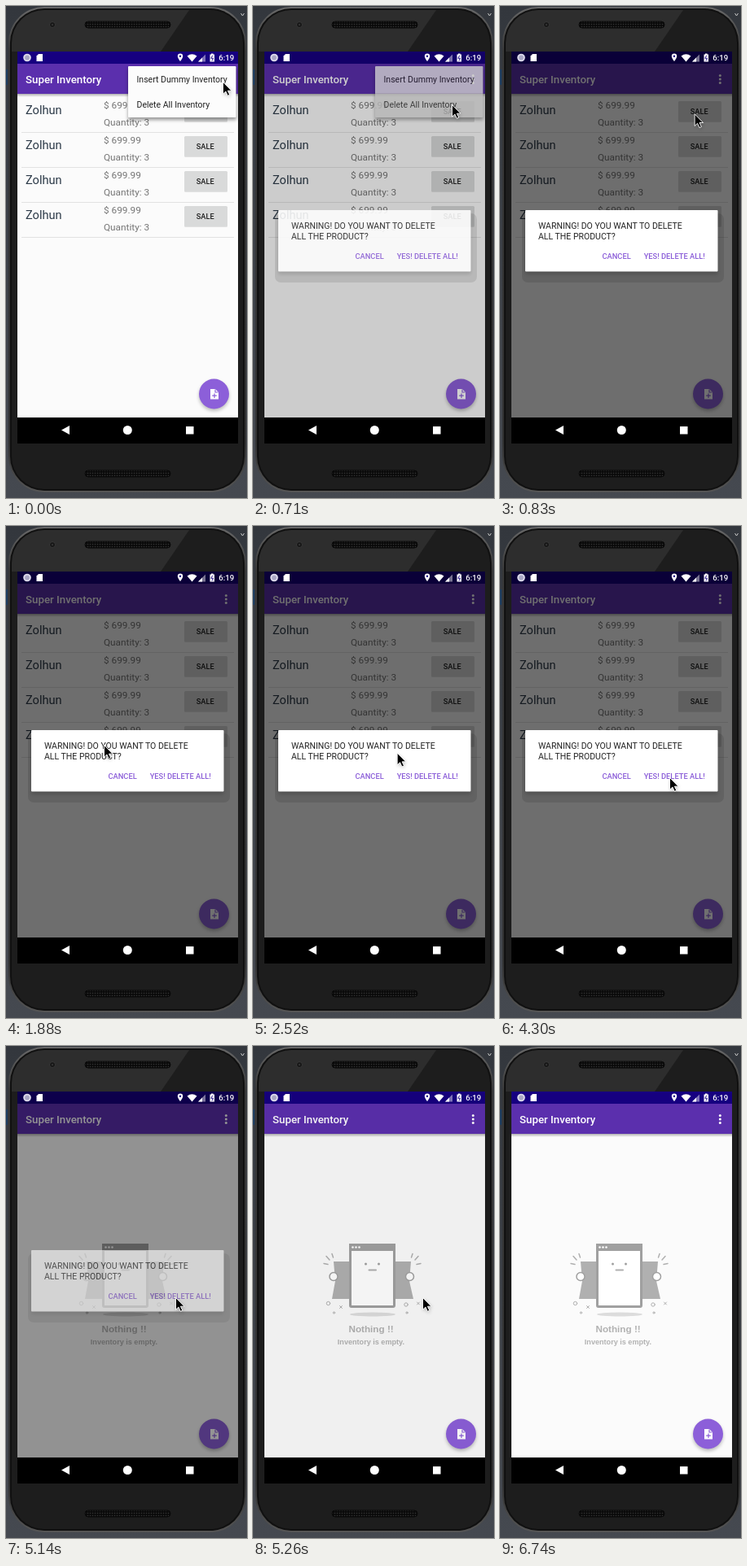
Recreate the animation shown at these times as an HTML page. Size 296x605 px, loop 7.4 s.

```html
<!DOCTYPE html>
<html lang="en">
<head>
<meta charset="utf-8">
<title>Super Inventory</title>
<style>
  html, body { margin: 0; width: 100%; height: 100%; overflow: hidden; background: #3a3e44; }
  svg { display: block; width: 296px; height: 605px; font-family: Roboto, sans-serif; }
  .name { font-size: 14.6px; fill: #2c3a48; }
  .info { font-size: 11.8px; fill: #757575; }
  .sale { font-size: 9.2px; font-weight: 500; fill: #1c1c1c; }
  .title { font-size: 13.3px; font-weight: 500; fill: #fff; }
  .item { font-size: 10.5px; fill: #222; }
  .ask { font-size: 10.5px; fill: #222; }
  .action { font-size: 9.3px; font-weight: 500; fill: #8a5cd8; }
  .note { font-family: "Liberation Sans", Arial, sans-serif; font-weight: bold; fill: #b2b2b2; }
  .line { fill: none; stroke: #b0b0b0; stroke-linecap: round; }
</style>
</head>
<body>
<svg viewBox="0 0 296 605">
  <defs>
    <linearGradient id="back" x2="0" y2="1">
      <stop offset="0" stop-color="#33373d"/><stop offset="1" stop-color="#454950"/>
    </linearGradient>
    <linearGradient id="rim" x2="0" y2="1">
      <stop offset="0" stop-color="#686868"/><stop offset=".09" stop-color="#383838"/>
      <stop offset=".9" stop-color="#303030"/><stop offset="1" stop-color="#555"/>
    </linearGradient>
    <linearGradient id="fall" x2="0" y2="1">
      <stop offset="0" stop-opacity=".3"/><stop offset="1" stop-opacity="0"/>
    </linearGradient>
    <pattern id="mesh" width="3" height="3" patternUnits="userSpaceOnUse">
      <rect width="3" height="3" fill="#0a0a0a"/><circle cx="1.5" cy="1.5" r=".8" fill="#333"/>
    </pattern>
    <filter id="soft" x="-20%" y="-20%" width="140%" height="150%"><feGaussianBlur stdDeviation="2"/></filter>
    <clipPath id="screen"><rect x="14" y="56" width="271" height="450"/></clipPath>
  </defs>

  <!-- phone -->
  <rect width="296" height="605" fill="url(#back)"/>
  <rect y="78" width="2" height="19" fill="#1c3d60"/>
  <path d="M288.500 9L290.500 12 292.500 9" fill="none" stroke="#c8c8c8"/>
  <rect x="3" y="1" width="292" height="597" rx="44" fill="url(#rim)"/>
  <rect x="5" y="3" width="288" height="593" rx="42" fill="#101010"/>
  <rect x="7" y="5" width="284" height="589" rx="40" fill="#1d1d1d"/>
  <path d="M7 56V45A40 40 0 0 1 47 5H225L190 56Z" fill="#fff" opacity=".07"/>
  <circle cx="57" cy="23" r="3.500" fill="#161616" stroke="#383838"/>
  <circle cx="57" cy="23" r="1.200" fill="#333"/>
  <rect x="97" y="19" width="105" height="8" rx="4" fill="url(#mesh)" stroke="#080808"/>
  <rect x="97" y="571" width="105" height="8" rx="4" fill="url(#mesh)" stroke="#080808"/>
  <rect x="14" y="56" width="271" height="482"/>

  <g clip-path="url(#screen)">
    <rect x="14" y="108" width="271" height="398" fill="#fbfbfb"/>
    <g id="list"></g>

    <g id="empty">
      <ellipse cx="147" cy="330" rx="28" ry="2.500" fill="#dcdcdc"/>
      <path d="M99 265H118V311H97L101 289ZM175 265H194L192 289 197 311H175Z" fill="#b0b0b0"/>
      <rect x="119.500" y="244.500" width="54" height="76" rx="1.500" fill="#fff" stroke="#a0a0a0" stroke-width="3"/>
      <path d="M118 243H175V252H118Z" fill="#a0a0a0"/>
      <g fill="#fff">
        <circle cx="122.500" cy="247.500" r="1.300"/><circle cx="126.500" cy="247.500" r="1.300"/><circle cx="130.500" cy="247.500" r="1.300"/>
      </g>
      <circle cx="138.500" cy="268" r="1.500" fill="#a0a0a0"/><circle cx="154.500" cy="268" r="1.500" fill="#a0a0a0"/>
      <path d="M142.500 275.500H151" class="line" stroke-width="2"/>
      <g fill="#fff" stroke="#a0a0a0" stroke-width="1.500">
        <circle cx="99" cy="283.500" r="5"/><circle cx="192.500" cy="283.500" r="5"/>
      </g>
      <path class="line" stroke-width="1.500" d="M97 255.500L98.500 260M90 258.500L94 263M87 267.500L92 268.500M196 255.500L194.500 260M203 258.500L199 263M206 267.500L201 268.500"/>
      <path class="line" d="M106.500 319.500l3 3m0-3l-3 3M201.500 315l3 3m0-3l-3 3"/>
      <g class="line">
        <circle cx="92.500" cy="316.500" r="2.200"/><circle cx="188" cy="318" r="2.200"/>
        <circle cx="99.500" cy="328" r="1.100"/><circle cx="189" cy="328" r="1.100"/>
      </g>
      <text class="note" x="117.500" y="352" font-size="11.700">Nothing !!</text>
      <text class="note" x="103.800" y="367.300" font-size="9.100">Inventory is empty.</text>
    </g>

    <rect x="14" y="56" width="271" height="15" fill="#160080"/>
    <rect x="14" y="71" width="271" height="37" fill="#5b2fad"/>
    <rect x="14" y="108" width="271" height="4" fill="url(#fall)"/>
    <text class="title" x="24" y="95">Super Inventory</text>
    <g fill="#fff">
      <circle cx="270.300" cy="85.500" r="1.500"/><circle cx="270.300" cy="90" r="1.500"/><circle cx="270.300" cy="94.500" r="1.500"/>
    </g>

    <circle cx="255.500" cy="479.500" r="18.500" opacity=".25" filter="url(#soft)"/>
    <circle cx="255.500" cy="477" r="18.500" fill="#8c5fd9"/>
    <path d="M251 471H257L261 475V483.500H251Z" fill="#fff"/>
    <path d="M257 471.500V475H260.500M256 476.500V482M253.200 479.200H258.800" fill="none" stroke="#8c5fd9" stroke-width="1.200"/>

    <g id="menu">
      <rect x="150" y="77" width="133" height="63" opacity=".4" filter="url(#soft)"/>
      <rect x="150" y="74" width="132.500" height="63" rx="1" fill="#fcfcfc"/>
      <rect id="press" x="150" y="107" width="132.500" height="30"/>
      <text class="item" x="160.500" y="94">Insert Dummy Inventory</text>
      <text class="item" x="160.500" y="125.300">Delete All Inventory</text>
    </g>

    <rect id="dim" x="14" y="56" width="271" height="450"/>

    <g id="dialog">
      <rect x="27" y="255" width="248" height="85" rx="7" opacity=".11"/>
      <rect x="31" y="254" width="236.500" height="76" rx="2" opacity=".15" filter="url(#soft)"/>
      <rect x="31" y="251" width="236.500" height="75.500" rx="1" fill="#fff"/>
      <text class="ask" x="47" y="274">WARNING! DO YOU WANT TO DELETE</text>
      <text class="ask" x="47" y="286.500">ALL THE PRODUCT?</text>
      <text class="action" x="125.500" y="311.300">CANCEL</text>
      <text class="action" x="176.700" y="311.300">YES! DELETE ALL!</text>
    </g>

    <!-- status icons -->
    <g fill="#fff">
      <circle cx="26" cy="63.500" r="4.800" fill="#dedcec"/>
      <circle cx="26" cy="63.500" r="2.900" fill="#a9a7c4"/>
      <path d="M40 59H45V68H37.500V61.500Z"/>
      <path d="M214 58.500a3.200 3.200 0 0 1 3.200 3.200c0 2.300-3.200 6.300-3.200 6.300s-3.200-4-3.200-6.300a3.200 3.200 0 0 1 3.200-3.200Z"/>
      <circle cx="214" cy="61.700" r="1.200" fill="#160080"/>
      <path d="M222.500 61.500Q228.500 57 234.500 61.500L228.500 68.500Z"/>
      <path d="M236 68.500L245 59.500V68.500Z" opacity=".45"/><path d="M236 68.500L241 63.500V68.500Z"/>
      <path d="M250.500 59.500H252V58.500H254.500V59.500H256V68.500H250.500Z"/>
      <path d="M253.700 60.800L251.800 64.300H254.600L252.900 67.300" fill="none" stroke="#160080" stroke-width=".9"/>
      <text x="261.200" y="67.400" font-size="9.600" font-weight="500">6:19</text>
    </g>
  </g>

  <g fill="#fff">
    <path d="M68 521.500L78 516V527Z"/><circle cx="149.300" cy="521.500" r="5.500"/><rect x="221" y="517" width="9.500" height="9.500"/>
  </g>

  <g id="cursor">
    <path d="M1 2V17L4.500 14 7 19 9.500 18 7.200 13H12Z" opacity=".25" filter="url(#soft)"/>
    <path d="M.5.500V15.200L3.900 12 6.300 17.300 8.800 16.200 6.400 11.200H11Z" stroke="#fff" stroke-width=".9"/>
  </g>
</svg>
<script>
const LOOP = 7400;
const [list, empty, menu, press, dim, dialog, cursor] =
  ['list', 'empty', 'menu', 'press', 'dim', 'dialog', 'cursor'].map(id => document.getElementById(id));

list.innerHTML = [0, 43, 86, 129].map(y => `<g transform="translate(0 ${y})">
  <text class="name" x="24" y="133">Zolhun</text>
  <text class="info" x="120" y="126">$ 699.99</text>
  <text class="info" x="120" y="147.300">Quantity: 3</text>
  <rect x="219" y="118" width="53" height="25" rx="1.500" opacity=".1"/>
  <rect x="219" y="117" width="53" height="25" rx="1.500" fill="#d9dada"/>
  <text class="sale" x="233.800" y="132.800">SALE</text>
  <path d="M19 155.500H280" stroke="#e2e2e2" stroke-width="1.200"/>
</g>`).join('');

// Pointer moves: first step, last step, number of steps, points along the way
const moves = [
  [120, 350, 5, [266, 93], [244, 121]],
  [590, 1300, 13, [244, 121], [244, 121], [234, 142], [160, 230], [98, 291]],
  [1350, 2060, 12, [98, 291], [74, 286], [65, 272], [120, 269], [144, 274]],
  [2120, 2810, 12, [144, 274], [185, 274], [200, 276], [130, 284], [65, 288]],
  [2870, 3560, 13, [65, 288], [107, 287], [140, 294]],
  [3620, 4300, 13, [140, 294], [180, 304], [208, 314], [208, 309]],
  [5860, 6270, 8, [208, 309], [238, 217], [150, 245], [108, 350], [125, 359]],
  [6450, 6682, 5, [125, 359], [185, 385], [266, 441]]
];

// Steps taken so far, the first one at `from`, the last one at `to`
const stepAt = (t, from, to, n) =>
  t < from ? 0 : Math.min(n, Math.floor((t - from) / ((to - from) / (n - 1)) + 1.02));

const pick = (values, k) => values[Math.min(k, values.length - 1)];

function pointerAt(t) {
  const [from, to, n, ...pts] = moves.filter(m => m[0] <= t).pop() || moves[0];
  const p = stepAt(t, from, to, n) / n * (pts.length - 1);
  const i = Math.min(Math.floor(p), pts.length - 2);
  return [0, 1].map(a => pts[i][a] + (pts[i + 1][a] - pts[i][a]) * (p - i));
}

function draw(t) {
  const open = stepAt(t, 590, 1300, 13);
  const close = stepAt(t, 5140, 5320, 4);

  list.style.opacity = close ? 0 : 1;
  empty.style.opacity = close ? 1 : 0;
  menu.style.opacity = pick([1, .95, .9, .8, .4, 0], open);
  press.style.opacity = open ? .1 : 0;
  dim.style.opacity = close
    ? pick([.56, .42, .2, .045, 0], close)
    : pick([0, .05, .12, .19, .4, .56], open);
  dialog.style.opacity = close ? pick([1, .6, .2, 0], close) : pick([0, .3, .65, .88, 1], open);

  cursor.setAttribute('transform', `translate(${pointerAt(t)})`);
  cursor.style.opacity = t < 6740 ? 1 : 0;
}

const start = performance.now();
function tick() {
  draw((performance.now() - start) % LOOP);
  requestAnimationFrame(tick);
}
tick();
</script>
</body>
</html>
```
